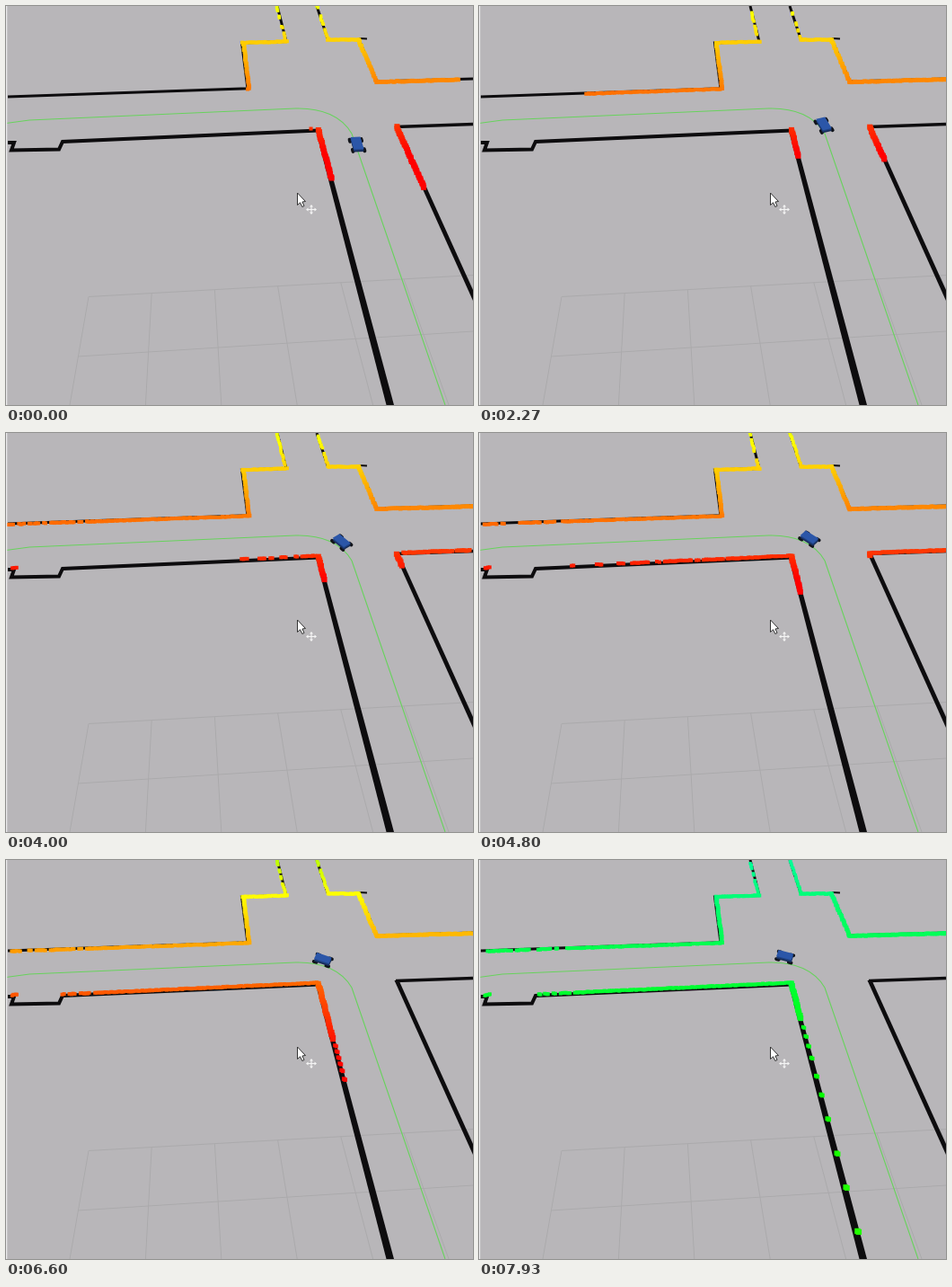
Animation of 520 by 444 pixels, one loop 8 s. Source, as an HTML page with a canvas:

```html
<!DOCTYPE html>
<html lang="en">
<head>
<meta charset="utf-8">
<title>Robot turning a corner with laser scan</title>
<style>
html, body { margin: 0; width: 100%; height: 100%; overflow: hidden; background: #b8b6b9; }
canvas { display: block; }
</style>
</head>
<body>
<canvas id="stage" width="520" height="444"></canvas>
<script>
const LOOP = 8000;
const STEP = 1000 / 15;
const ctx = document.getElementById('stage').getContext('2d');

const clamp01 = v => Math.max(0, Math.min(1, v));
const mix = (a, b, k) => a + (b - a) * k;
const ramp = (t, start, end) => clamp01((t - start) / (end - start));
const smooth = k => k * k * (3 - 2 * k);

// Seeded noise in 0..1.
function hash(a, b, c) {
  const v = Math.sin(a * 12.9898 + b * 78.233 + c * 37.719) * 43758.5453;
  return v - Math.floor(v);
}

function trace(points) {
  ctx.beginPath();
  points.forEach(([x, y], i) => i ? ctx.lineTo(x, y) : ctx.moveTo(x, y));
}

function line(points, width, color) {
  trace(points);
  ctx.lineWidth = width;
  ctx.strokeStyle = color;
  ctx.stroke();
}

function fill(points, color) {
  trace(points);
  ctx.closePath();
  ctx.fillStyle = color;
  ctx.fill();
}

// ---- fixed scene ----
const INK = '#0d0c0e';

function drawGrid() {
  const color = '#abaaac';
  line([[92, 323.5], [520, 299.5]], 1, color);
  line([[80, 390], [520, 362]], 1, color);
  for (let i = 0; i < 7; i++) {
    line([[92 + i * 70.2, 323.5 - i * 3.9], [71 + i * 84.4, 444]], 1, color);
  }
}

function drawWalls() {
  line([[2, 101], [269, 91.7], [262.5, 41], [312, 39.5], [302, 0]], 3, INK);
  line([[346, 0], [358.5, 37.5], [393, 37.5], [413, 84], [520, 81]], 3, INK);
  line([[393, 36], [402, 36.5]], 2, INK);
  line([[2, 152], [9, 152], [6, 160.5], [59, 159.5], [63, 151], [348, 138.5]], 4, INK);
  line([[434, 134.5], [520, 131.5]], 3.5, INK);
  fill([[344.5, 137], [349.5, 137], [432, 444], [423.5, 444]], INK);
  fill([[432.5, 134], [437.5, 134], [520, 316], [520, 328]], INK);
}

function drawPath() {
  ctx.beginPath();
  ctx.moveTo(0, 130.5);
  ctx.lineTo(26, 127);
  ctx.lineTo(322, 114);
  ctx.bezierCurveTo(352, 113, 374, 123, 385, 142);
  ctx.lineTo(489, 444);
  ctx.lineWidth = 1.1;
  ctx.strokeStyle = '#68d25d';
  ctx.stroke();
}

function drawPointer() {
  const arrow = [[324.5, 208], [324.5, 221.5], [327.6, 218.8], [329.8, 223.5],
    [332, 222.5], [329.9, 218], [333.5, 217.5]];
  fill(arrow, '#fff');
  trace(arrow);
  ctx.closePath();
  ctx.lineWidth = 1;
  ctx.strokeStyle = '#333';
  ctx.stroke();
  const pale = '#f4f4f4';
  line([[335, 226.5], [345, 226.5]], 1.2, pale);
  line([[340, 222], [340, 231]], 1.2, pale);
  for (const s of [-1, 1]) {
    fill([[340 + s * 6, 226.5], [340 + s * 3.5, 224.5], [340 + s * 3.5, 228.5]], pale);
    fill([[340, 226.5 + s * 5.5], [338, 226.5 + s * 3], [342, 226.5 + s * 3]], pale);
  }
}

// ---- laser scan ----
// As the rear opens up, the colour range widens, then lifts towards green.
const widen = t => ramp(t, 6130, 7150) ** 2;
const lift = t => ramp(t, 7200, 7930);

function hue(y, t) {
  const wide = widen(t), up = lift(t);
  const reach = mix(165, 430, wide);
  const low = mix(0, 6, wide) + 106 * up;
  const span = mix(64, 112, wide) - 68 * up;
  return low + span * clamp01((reach - y) / reach) ** (1 + wide);
}

const always = () => 1;
const never = () => 0;

// How much of the left corridor wall is covered without gaps.
const leftCover = t => 0.18 - 0.11 * ramp(t, 0, 3100)
  + 0.16 * ramp(t, 3100, 5950) ** 2 - 0.1 * ramp(t, 6200, 7930);

// Each wall: ends, offset, dot size, covered part and chance of a hit.
function wall(a, b, off, size, { from = never, to = always, dense = always } = {}) {
  return { a, b, off, size, from, to, dense };
}

const walls = [
  wall([2, 101], [269, 91.7], [0, 0.7], 4, {
    from: t => 1 - ramp(t, 0, 2750) ** 3,
    dense: x => 0.5 + x / 250
  }),
  wall([269, 91.7], [262.5, 41], [1.8, 0], 4.5),
  wall([263, 41], [312, 39.5], [0.5, 0], 4),
  wall([312, 39.5], [302, 0], [-0.5, 0], 3.5, { dense: () => 0.65 }),
  wall([346, 0], [358.5, 37.5], [0.3, 0], 3.5, { dense: (x, t) => mix(0.5, 0.95, t / LOOP) }),
  wall([358.5, 37.5], [393, 37.5], [0, 0], 4),
  wall([393, 37.5], [413, 84], [-0.5, 0], 4.5),
  wall([413, 84], [520, 81], [0, 0.6], 4.5, { to: t => mix(0.87, 1, ramp(t, 0, 800)) }),
  wall([347, 138], [428, 444], [1, 0], 6, { to: leftCover }),
  wall([435, 134.5], [520, 323], [0, 0], 6, { to: t => 0.36 * (1 - ramp(t, 0, 5000)) - 0.001 }),
  wall([435, 134], [520, 131], [0, -0.5], 4.5, {
    from: t => 1.01 * ramp(t, 4800, 6020),
    dense: (x, t) => ramp(t, 3470, 4270)
  }),
  wall([63, 150.5], [348, 137.5], [0, -1], 4, {
    dense: (x, t) => 0.75 - 2 * (1 - ramp(t, 3400, 7200)) ** 2 + (x - 63) / 220
  }),
  wall([7, 150.5], [12, 149.5], [0, 0], 4, { dense: (x, t) => t > 2670 ? 1 : 0 })
];

function dot(x, y, size, t) {
  ctx.fillStyle = `hsl(${hue(y, t)}, 100%, 50%)`;
  ctx.fillRect(x - size / 2, y - size / 2, size, size);
}

function drawScan({ a, b, off, size, from, to, dense }, id, t, tick) {
  const count = Math.ceil(Math.hypot(b[0] - a[0], b[1] - a[1]) / 2);
  for (let i = 0; i <= count; i++) {
    const k = i / count;
    if (k < from(t) || k > to(t)) continue;
    const x = mix(a[0], b[0], k), y = mix(a[1], b[1], k);
    if (hash(i >> 1, id, tick >> 2) >= dense(x, t)) continue;
    const dx = hash(i, id, tick) - 0.5, dy = hash(i, id + 50, tick) - 0.5;
    dot(x + off[0] + dx, y + off[1] + dy * 0.8, size, t);
  }
}

// Single hits down the left wall, ever further apart.
function drawFarHits(t, tick) {
  const reach = 200 + 72 * ramp(t, 6000, 6930) + 168 * ramp(t, 6930, 7000);
  const growth = mix(1.15, 1.22, lift(t));
  let gap = mix(5, 8, lift(t));
  let y = 138 + 306 * leftCover(t) + gap;
  for (let i = 0; t > 5950 && y < reach; i++) {
    const size = mix(4, 6.5, (y - 190) / 240);
    const x = 348 + (y - 138) * 0.267;
    dot(x, y, size, t);
    dot(x + 1.5, y + 1, size, t);
    gap *= growth;
    y += gap * mix(0.8, 1.2, hash(i, 90, tick >> 3));
  }
}

// ---- car ----
const ROUTE = [[391, 155], [388, 124], [365, 114], [340, 108]];

function routeAt(u) {
  const v = 1 - u;
  const weights = [v * v * v, 3 * v * v * u, 3 * v * u * u, u * u * u];
  return [0, 1].map(axis => weights.reduce((sum, w, i) => sum + w * ROUTE[i][axis], 0));
}

function drawCar(t) {
  const u = t / LOOP;
  const [cx, cy] = routeAt(u);
  const turn = smooth(u) * 65 * Math.PI / 180;
  const size = mix(1, 0.92, u);
  const c = Math.cos(turn) * size, s = Math.sin(turn) * size;
  // Ground plane in perspective: up the corridor and to the left.
  const at = (f, l, height = 0) => {
    const up = f * c - l * s, left = f * s + l * c;
    return [cx - up * 0.22 - left, cy - up * 0.74 + left * 0.05 - height];
  };
  const box = (f, l, height) =>
    [at(f, l, height), at(f, -l, height), at(-f, -l, height), at(-f, l, height)];

  ctx.lineCap = 'round';
  for (const f of [7.5, -7.5]) {
    for (const l of [6.5, -6.5]) line([at(f - 1.5, l), at(f + 1.5, l)], 3.8, '#111319');
  }
  ctx.lineCap = 'butt';
  fill(box(9, 5.5, -0.5), '#172b55');
  fill(box(9, 5.5, 1), '#1f407f');
  fill(box(9, 5.5, 2.5), '#2b56a8');
}

// ---- playback ----
function draw(now) {
  const tick = Math.floor((now % LOOP + 5) / STEP) % (LOOP / STEP);
  const t = tick * STEP;
  ctx.fillStyle = '#b8b6b9';
  ctx.fillRect(0, 0, 520, 444);
  drawGrid();
  drawWalls();
  drawPath();
  walls.forEach((w, id) => drawScan(w, id, t, tick));
  drawFarHits(t, tick);
  drawCar(t);
  drawPointer();
  ctx.fillStyle = '#e8e7e9';
  ctx.fillRect(0, 0, 1.3, 444);
}

const start = performance.now();
function frame() {
  draw(performance.now() - start);
  requestAnimationFrame(frame);
}
frame();
</script>
</body>
</html>
```
